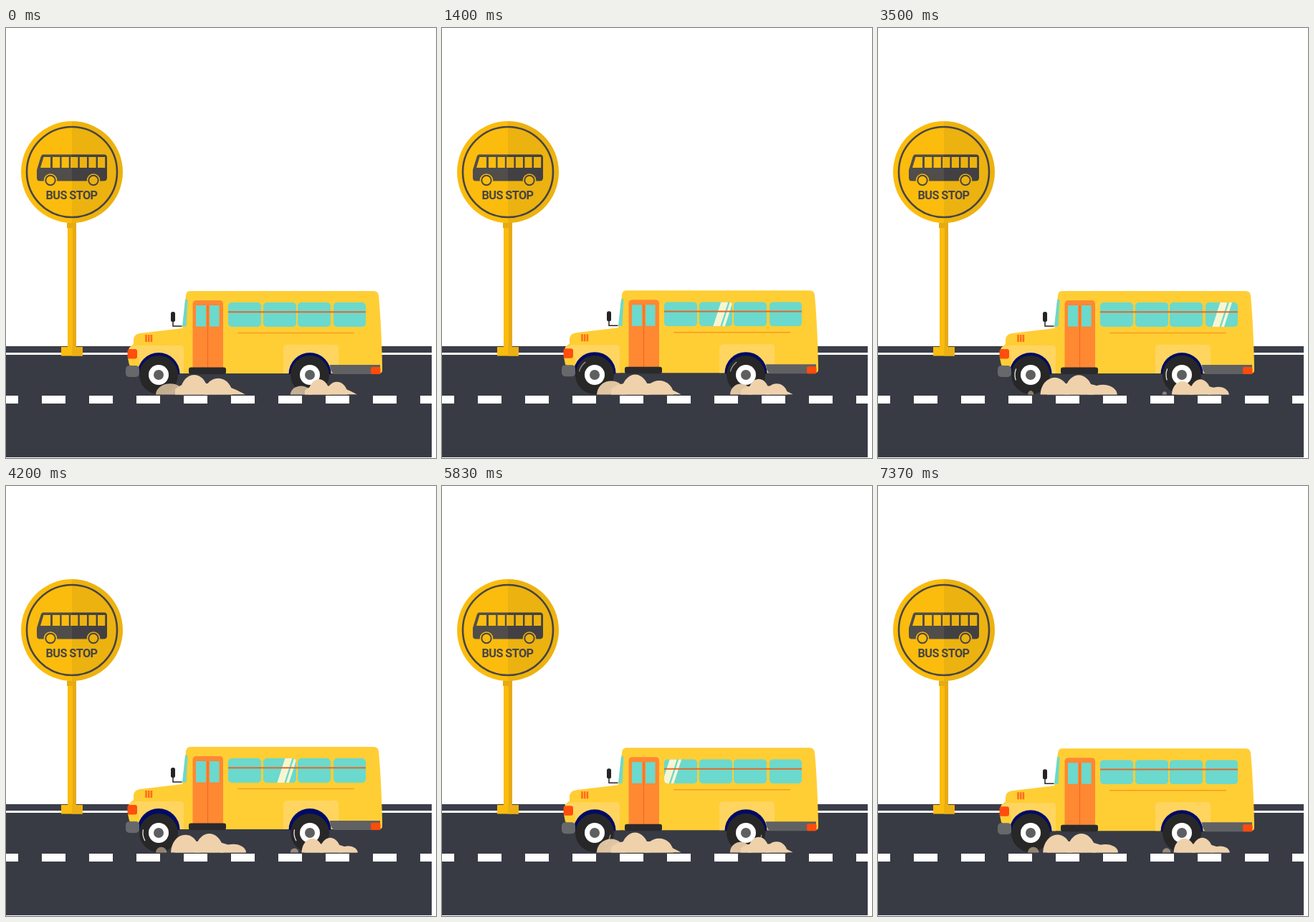
An HTML page for the animation above (7410 ms loop, 600 px wide and 600 px high).

```html
<!DOCTYPE html>
<html lang="en">
<head>
<meta charset="utf-8">
<title>Bus stop</title>
<style>
html, body { margin: 0; width: 100%; height: 100%; overflow: hidden; background: #fff; }
svg { display: block; width: 100%; height: 100%; }
text { font: bold 16.3px Roboto, "Liberation Sans", sans-serif; letter-spacing: -.6px; }
</style>
</head>
<body>
<svg viewBox="0 0 600 600">
  <defs>
    <clipPath id="panes">
      <rect x="310" y="383" width="46" height="34" rx="5"/>
      <rect x="359" y="383" width="46" height="34" rx="5"/>
      <rect x="407" y="383" width="46" height="34" rx="5"/>
      <rect x="457" y="383" width="45" height="34" rx="5"/>
    </clipPath>
    <clipPath id="ground"><rect x="200" y="440" width="140" height="71.5"/></clipPath>
    <clipPath id="arches"><rect x="180" y="440" width="300" height="43"/></clipPath>
    <linearGradient id="duo">
      <stop offset=".5" stop-color="#504d4a"/>
      <stop offset=".5" stop-color="#444244"/>
    </linearGradient>
    <g id="tyre">
      <circle r="27" fill="#272728"/>
      <circle r="14" fill="#fff"/>
      <circle r="7" fill="#5e5f61"/>
    </g>
    <path id="shine" d="M20.7 -7.5A22 22 0 0 1 20.7 7.5" fill="none" stroke="#fff" stroke-width="1.3" stroke-linecap="round"/>
    <g id="signWheel">
      <circle r="9.3" fill="#fbbc0d"/>
      <circle r="7.7" fill="#484546"/>
      <circle r="5.7" fill="#fbbc0d"/>
    </g>
  </defs>

  <!-- road -->
  <path d="M0 444H594V599H0Z" fill="#383b44"/>
  <path d="M0 444H594V453H0Z" fill="#3b3d49"/>
  <path d="M0 454.5H594" stroke="#fff" stroke-width="3"/>
  <path d="M-16 518.5H594" stroke="#fff" stroke-width="11" stroke-dasharray="33 33"/>

  <!-- stop sign -->
  <path d="M86 268H98V447H86Z" fill="#fbbc0d"/>
  <path d="M93 268H98V447H93ZM85 272H98V279H85Z" fill="#e6aa14"/>
  <path d="M77 445H107V457.5H77Z" fill="#fbbc0d"/>
  <path d="M92 445H107V457.5H92Z" fill="#edb013"/>
  <circle cx="92" cy="201" r="71" fill="#fbbc0d"/>
  <circle cx="92" cy="201" r="63" fill="none" stroke="#484546" stroke-width="2.6"/>
  <path d="M52 176.5H137Q141 176.5 141 181V209Q141 213.5 136 213.5H47Q43 213.5 43 209V198L48.5 180Q49.5 176.5 52 176.5Z" fill="url(#duo)"/>
  <path d="M52.5 180H62V195H48Z" fill="#fbbc0d"/>
  <path d="M65 187.5H138.500" stroke="#fbbc0d" stroke-width="15" stroke-dasharray="10.200 2.400"/>
  <use href="#signWheel" x="62" y="212.500"/>
  <use href="#signWheel" x="122" y="212.500"/>
  <text x="91.500" y="239" text-anchor="middle" fill="#484546">BUS STOP</text>
  <path d="M92 130A71 71 0 0 1 92 272Z" fill="#2b2b40" opacity=".07"/>

  <!-- bus body -->
  <g id="body">
    <path d="M257 367H513Q519 367 520 373Q523.500 410 525 470V478Q525 482 520 482H186L172 470Q168 455 172 446L178 441V434Q179 427 187 426L246 419L251 373Q252 367 257 367Z" fill="#ffce35"/>
    <path d="M250 379H253.500L251.500 416.500H246Z" fill="#6bd9cd"/>
    <path d="M181 443H243Q248 443 248 448V482H186V460H174L172 446ZM393 442H459Q464 442 464 447V482H387V448Q387 442 393 442Z" fill="#ffd560"/>
    <g clip-path="url(#arches)" fill="#000a66">
      <circle cx="213" cy="482.500" r="29.500"/>
      <circle cx="424" cy="482.500" r="29.500"/>
    </g>
    <path d="M195.500 428V438M199.200 428V438M202.900 428V438" stroke="#ff6d1c" stroke-width="2.600"/>
    <rect x="169.500" y="448" width="13.500" height="13.500" rx="3" fill="#ff4e0d"/>
    <rect x="167" y="471" width="19" height="16" rx="5" fill="#67686a"/>
    <path d="M452 470H522V483H457Q452 478 452 470Z" fill="#606163"/>
    <rect x="509" y="473" width="13.500" height="10" rx="2" fill="#ff4b0c"/>
    <path d="M260.500 475V385Q260.500 380 266 380H298Q303 380 303 385V475Z" fill="#ff8833"/>
    <path d="M265 387H279V416.500H265ZM284 387H297.500V416.500H284Z" fill="#6bd9cd"/>
    <path d="M281.500 387V474" stroke="#f26b20" stroke-width="1.200"/>
    <rect x="255" y="473.500" width="52" height="9.500" rx="3" fill="#2a2a2c"/>
    <path d="M323 425.500H486" stroke="#f99a20" stroke-width="1.500"/>
    <g clip-path="url(#panes)">
      <path d="M305 380H510V420H305Z" fill="#6bd9cd"/>
      <path id="glare" d="M0 417L11 383H21L10 417ZM12.500 417L23.500 383H27.500L16.500 417Z" fill="#f7f6d2"/>
    </g>
    <path d="M310 396.300H502" stroke="#e2682a" stroke-width="2"/>
    <rect x="230" y="396" width="6" height="14" rx="2.500" fill="#242426"/>
    <path d="M233 409V416H245.500" fill="none" stroke="#242426" stroke-width="1.500"/>
  </g>

  <!-- wheels -->
  <g transform="translate(213 484)"><use href="#tyre"/><use class="spin" href="#shine"/></g>
  <g transform="translate(424 484)"><use href="#tyre"/><use class="spin" href="#shine"/></g>

  <!-- dust -->
  <g id="dust" clip-path="url(#ground)" fill="#efd2ac">
    <path d="M236 512V504Q244 497 254 496H292Q312 499 334 511.500Z"/>
  </g>
  <use href="#dust" transform="translate(399 511.500) scale(.746 .78) translate(-212 -511.500)"/>
</svg>
<script>
const LOOP = 7410, BOB = 497, GLARE = 933.3, PUFF = 633.5, SPIN = 680;
const $ = q => document.querySelector(q);
const body = $('#body'), glare = $('#glare'), dust = $('#dust');
const spins = document.querySelectorAll('.spin');
const clamp = (v, lo, hi) => Math.max(lo, Math.min(hi, v));

function set(el, attrs) {
  for (const name in attrs) el.setAttribute(name, attrs[name]);
}

const puffs = Array.from({ length: 4 }, () => {
  const el = document.createElementNS('http://www.w3.org/2000/svg', 'ellipse');
  dust.append(el);
  return el;
});

function draw(t) {
  const bob = 1.5 * (Math.cos(2 * Math.PI * t / BOB) - 1);
  set(body, { transform: `translate(0 ${bob})` });

  // The glare gathers speed as it crosses the panes
  const g = (t - 1400 + GLARE * 2.5) % GLARE - GLARE / 2;
  set(glare, { transform: `translate(${378 + .34 * g + .00016 * g * g} 0)` });

  const angle = 235 - 360 * t / SPIN;
  const glow = .9 * Math.sin(Math.PI * t / LOOP);
  for (const s of spins) set(s, { transform: `rotate(${angle})`, opacity: glow });

  // Puffs drift back in a row, swelling and then sinking
  puffs.forEach((el, i) => {
    const x = 195.5 + 33.5 * (i + t / PUFF % 1);
    const swell = Math.sin(Math.PI * clamp((x - 205) / 130, 0, 1));
    set(el, {
      cx: x, cy: 511.5,
      rx: clamp(Math.min(x - 209, 335 - x), 0, 20),
      ry: 28 * swell,
      opacity: clamp((x - 190) / 50, .5, 1)
    });
  });
}

const start = performance.now();
function tick() {
  draw((performance.now() - start) % LOOP);
  requestAnimationFrame(tick);
}
tick();
</script>
</body>
</html>
```
